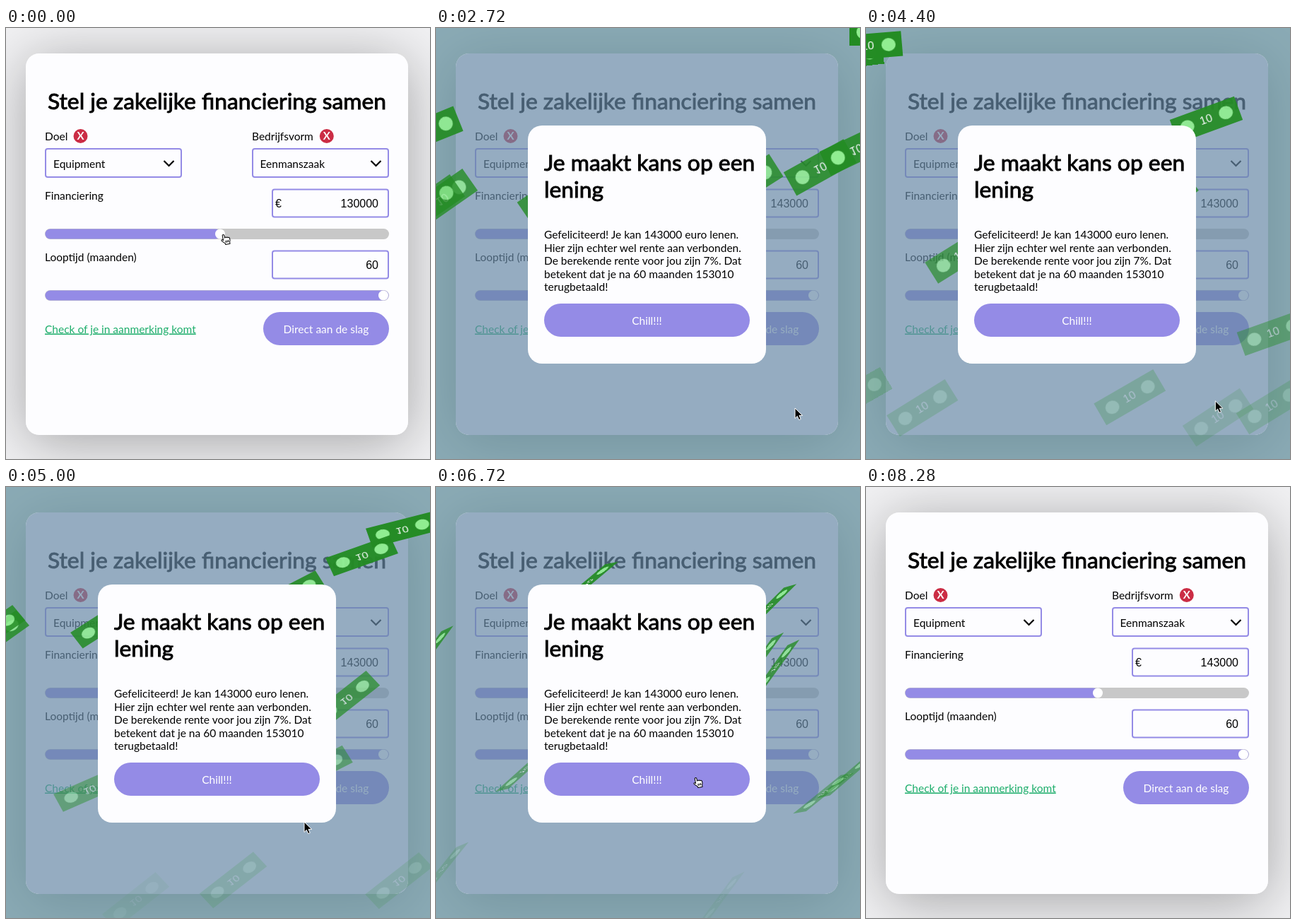
Animation of 600 by 610 pixels, one loop 8.6 s. Source, as an HTML page:

```html
<!DOCTYPE html>
<html lang="nl">
<head>
<meta charset="utf-8">
<title>Zakelijke financiering</title>
<style>
  html, body { margin: 0; width: 100%; height: 100%; overflow: hidden; }
  body { position: relative; background: #f1f1f3; }
  svg, .layer { position: absolute; left: 0; top: 0; width: 600px; height: 610px; overflow: hidden; }
  .shadow, .card { position: absolute; left: 28px; top: 36px; width: 541px; height: 540px; border-radius: 19px; }
  .shadow { box-shadow: 0 10px 80px rgba(0, 0, 0, .32); }
  .card { background: #fdfdff; }
  .dim { opacity: 0; }
  .page { background: rgba(94, 139, 154, .69); }
  .tint { background: rgba(104, 136, 165, .69); }
  text { font: 15.5px Lato, sans-serif; fill: #000; white-space: pre; }
  .h { font-size: 31.8px; stroke: #000; stroke-width: .9; }
  .n { font: 16px "Liberation Sans", Arial, sans-serif; }
  .w { fill: #fff; }
  .x { font: bold 15px Lato, sans-serif; fill: #fff; }
  .mid { text-anchor: middle; }
  .end { text-anchor: end; }
  .box { fill: #fdfdff; stroke: #948be6; stroke-width: 2; }
  .lila { fill: #948be6; }
  .track { fill: #c8c8c8; }
  .chev { fill: none; stroke: #000; stroke-width: 2.2; }
  .link { fill: #1eae6c; text-decoration: underline; }
  .note { position: absolute; left: -48.5px; top: -19px; width: 97px; height: 38px; background: #228b22;
    color: #fff; font: 16px/38px "Liberation Sans", Arial, sans-serif; text-align: center; }
  .note::before, .note::after { content: ""; position: absolute; top: 9px; width: 20px; height: 20px;
    border-radius: 50%; background: #90ee90; }
  .note::before { left: 9.5px; }
  .note::after { right: 9.5px; }
</style>
</head>
<body>
<div class="shadow"></div>
<div class="layer dim page"></div>
<div class="card"></div>
<svg viewBox="0 0 600 610">
  <text class="h mid" x="298.5" y="115">Stel je zakelijke financiering samen</text>
  <text x="55" y="158.5">Doel</text>
  <text x="348" y="158.5">Bedrijfsvorm</text>
  <g fill="#cb2d45"><circle cx="105.5" cy="153" r="10"/><circle cx="453.8" cy="153" r="10"/></g>
  <text class="x mid" x="105.5" y="158.3">X</text>
  <text class="x mid" x="453.8" y="158.3">X</text>
  <rect class="box" x="56" y="171" width="192" height="40" rx="3"/>
  <rect class="box" x="349" y="171" width="192" height="40" rx="3"/>
  <text x="67" y="197.5">Equipment</text>
  <text x="359.5" y="197.5">Eenmanszaak</text>
  <path class="chev" d="M223.5 188l7 7 7-7"/>
  <path class="chev" d="M516.5 188l7 7 7-7"/>
  <text x="55" y="243">Financiering</text>
  <text x="55" y="330">Looptijd (maanden)</text>
  <rect class="box" x="377" y="228.5" width="164" height="39" rx="3"/>
  <rect class="box" x="377" y="315.5" width="164" height="39" rx="3"/>
  <text class="n" x="381" y="254">€</text>
  <text class="n end" id="sum" x="527" y="254">130000</text>
  <text class="n end" x="527" y="341">60</text>
  <rect class="track" x="55" y="284" width="487" height="15" rx="7.5"/>
  <rect class="lila" id="fill" x="55.5" y="284.5" width="248" height="14" rx="7"/>
  <circle class="w" id="knob" cx="303" cy="291.5" r="7"/>
  <rect class="track" x="55" y="371" width="487" height="15" rx="7.5"/>
  <rect class="lila" x="55.5" y="371.5" width="486" height="14" rx="7"/>
  <circle class="w" cx="534" cy="378.5" r="7"/>
  <text class="link" x="55" y="431.5">Check of je in aanmerking komt</text>
  <rect class="lila" x="364" y="402" width="178" height="47" rx="23.5"/>
  <text class="w mid" x="453" y="431.5">Direct aan de slag</text>
</svg>
<div class="card dim tint"></div>
<div class="layer dim" id="rain"></div>
<svg viewBox="0 0 600 610">
  <g class="dim">
    <rect x="130" y="138" width="337" height="337" rx="20" fill="#fdfdff"/>
    <text class="h" x="153" y="202">Je maakt kans op een</text>
    <text class="h" x="153" y="240">lening</text>
    <text x="153" y="298">Gefeliciteerd! Je kan 143000 euro lenen.</text>
    <text x="153" y="316.5">Hier zijn echter wel rente aan verbonden.</text>
    <text x="153" y="335">De berekende rente voor jou zijn 7%. Dat</text>
    <text x="153" y="353.5">betekent dat je na 60 maanden 153010</text>
    <text x="153" y="372">terugbetaald!</text>
    <rect class="lila" x="153" y="390" width="291" height="47" rx="23.5"/>
    <text class="w mid" x="298.5" y="419.5">Chill!!!</text>
  </g>
  <g id="cursor">
    <path id="arrow" d="M0 0V14.5L3.3 11.4 5.6 16.6 8.2 15.5 6 10.4H10.6Z" fill="#000" stroke="#fff"/>
    <g id="hand" transform="rotate(-12) translate(-4.5 -.5)" fill="#fff" stroke="#000" stroke-linejoin="round">
      <path d="M3.3 9V2Q4.6 0 5.9 2V6Q7.3 4.5 8.3 6Q9.7 5 10.5 6.5Q12 6 12.6 7.5V10.5L11.6 13.3V15.5H5.2V14L1 9.6Q0 7 2.5 8Z"/>
      <path d="M6.3 10v3M8.2 10v3M10 10v3"/>
    </g>
  </g>
</svg>
<script>
const LOOP = 8600;
const el = id => document.getElementById(id);
const clamp = v => Math.max(0, Math.min(1, v));
const ease = p => p * p * (3 - 2 * p);

// Piecewise interpolation of column i in rows [key, ...values]
function at(rows, k, i = 1, shape = p => p) {
  const n = rows.findIndex(r => r[0] > k);
  if (n === 0) return rows[0][i];
  if (n < 0) return rows[rows.length - 1][i];
  const a = rows[n - 1], b = rows[n];
  return a[i] + (b[i] - a[i]) * shape((k - a[0]) / (b[0] - a[0]));
}

const path = [
  [40, 307, 292], [640, 332, 292], [1000, 332, 292], [1240, 422, 433], [2000, 422, 433],
  [2400, 508, 538], [4300, 508, 538], [4700, 422, 474], [5800, 422, 474], [6300, 367, 411],
  [7500, 367, 411], [8000, 420, 640]
];
const handTimes = [[0, 1040], [1180, 2040], [6150, 7600]];
const lean = [[0, 0], [60, -10], [240, -35], [300, -34], [430, -19], [560, -34]];

const drops = [];

// Adds notes that pass [x, y] at time t0, falling at v px/ms and drifting sideways in px/s
function rain(t0, v, ...spots) {
  for (const [x, y, drift = 0] of spots) {
    const node = document.createElement("div");
    node.className = "note";
    node.textContent = "10";
    el("rain").append(node);
    const start = (y - 200) / (y < 200 ? 1.6 * v : v);
    drops.push({ node, t0, x, v, drift, start });
  }
}

rain(2720, .21, [-14, 146], [543, 197, -27], [594, 171, -12], [633, 5, -34]);
rain(2720, .25, [8, 242, -75], [-10, 250, -75]);
rain(2720, .18, [440, 220, -40], [165, 235, -51]);
rain(3760, .22, [312, 480, -20], [233, 520, -20]);
rain(3760, .26, [400, 3, 32]);
rain(3760, .178, [150, 207, -26]);
rain(5000, .173, [560, 60, 12], [503, 97, 26]);
rain(5000, .19, [-16, 213, 15], [-22, 205, -40]);
rain(5000, .24, [402, 152], [140, 191], [481, 300], [321, 556], [183, 585]);
rain(6720, .22, [215, 135], [470, 170], [-10, 235], [458, 245], [480, 255], [125, 400]);
rain(7400, .2, [90, 60], [330, 30], [575, 80]);

function drawNote(d, t) {
  const s = d.start + t - d.t0;
  const y = 200 + s * d.v * (s < 0 ? 1.6 : 1);
  const shown = t >= 1980 && y > -70 && y < 610;
  d.node.style.display = shown ? "" : "none";
  if (!shown) return;
  const x = d.x + d.drift * (t - d.t0) / 1000;
  const spin = 360 * (t - 2720) / 1078;
  const edge = Math.sin(spin * Math.PI / 180) ** 4;
  d.node.style.opacity = 1 - clamp(y / 610) ** 1.7;
  d.node.style.transform = `translate(${x}px, ${y}px) rotateZ(${at(lean, y) - 22 * edge}deg) ` +
    `rotateY(${30 * edge}deg) rotateX(${180 + spin}deg)`;
}

function draw(now) {
  const t = now % LOOP;

  const drag = clamp((t - 40) / 600);
  const knob = 303 + 25 * drag;
  el("knob").setAttribute("cx", knob);
  el("fill").setAttribute("width", knob - 55);
  el("sum").textContent = 130000 + 1000 * Math.round(13 * drag);

  const veil = clamp((t - 1400) / 320) * (1 - clamp((t - 7560) / 400));
  document.querySelectorAll(".dim").forEach(n => n.style.opacity = veil);
  drops.forEach(d => drawNote(d, t));

  const hand = handTimes.some(([a, b]) => t >= a && t < b);
  el("hand").style.display = hand ? "" : "none";
  el("arrow").style.display = hand ? "none" : "";
  el("cursor").setAttribute("transform", `translate(${at(path, t, 1, ease)} ${at(path, t, 2, ease)})`);

  requestAnimationFrame(draw);
}
requestAnimationFrame(draw);
</script>
</body>
</html>
```
